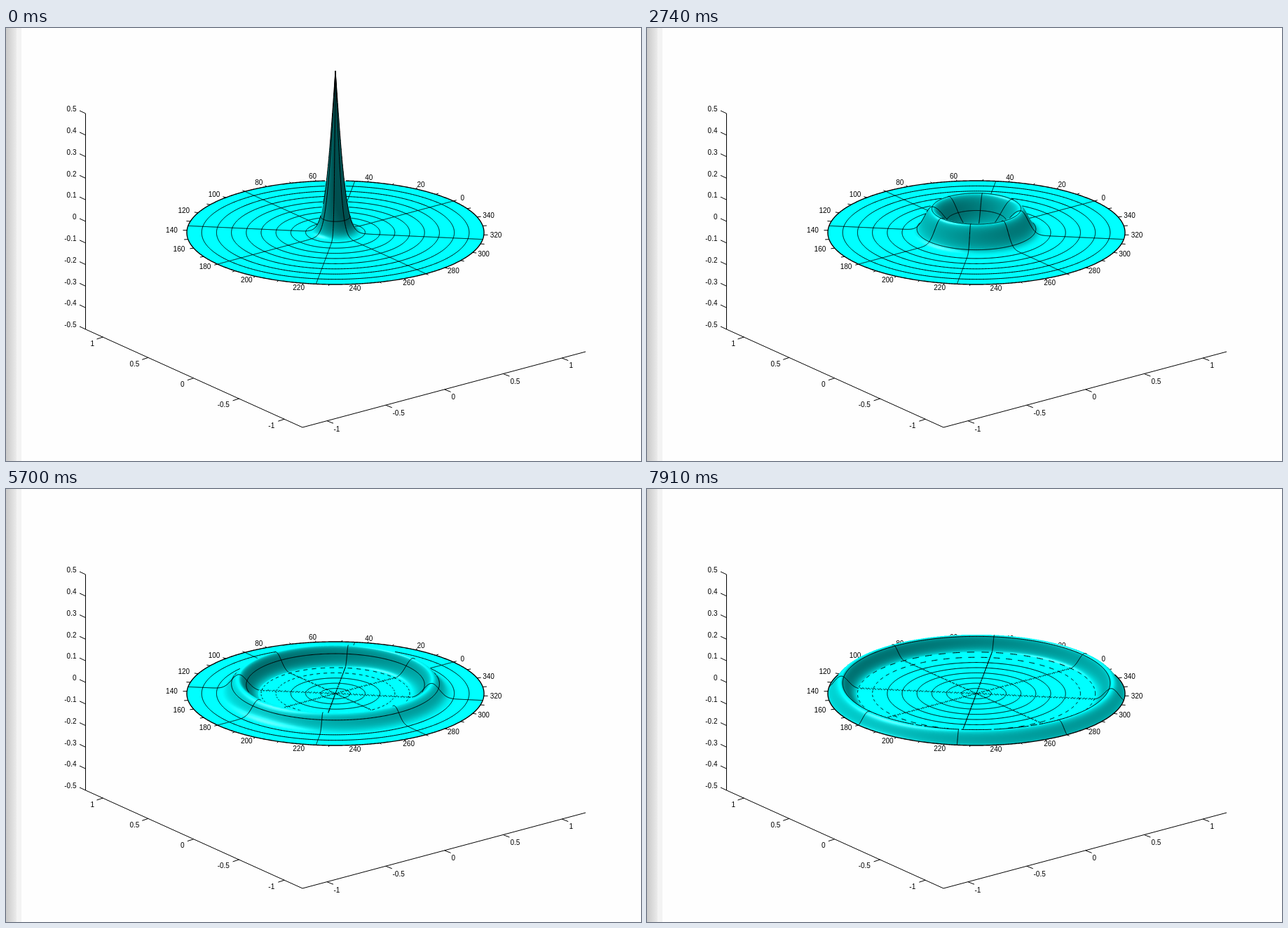
Write an HTML page with a canvas that moves like this. It is 906 px wide and 618 px high and loops after 8000 ms.

```html
<!DOCTYPE html>
<html lang="en">
<head>
<meta charset="utf-8">
<title>Circular wave</title>
<style>
  html, body { margin: 0; width: 100%; height: 100%; overflow: hidden; background: #fefefe; }
  canvas { display: block; width: 100vw; height: 100vh; }
</style>
</head>
<body>
<canvas id="stage" width="906" height="618"></canvas>
<script>
const ctx = document.getElementById('stage').getContext('2d');
const CX = 470, CY = 292, RX = 212, RY = 74, ZS = 308;   // projection
const TURN = 37.5;                                       // screen angle of 0 degrees
const X0 = 256, Y0 = 52, S = 2, COLS = 428 * S, ROWS = 318 * S;
const N = 2000;
const LOOP = 8000, FIRST = 498, STEP = 148.2, LAST = 51;

const surface = document.createElement('canvas');
surface.width = COLS;
surface.height = ROWS;
const sctx = surface.getContext('2d');
const img = sctx.createImageData(COLS, ROWS);
const depth = new Float32Array(COLS * ROWS);
const height = new Float32Array(N + 2);

const unit = v => { const l = Math.hypot(...v); return v.map(c => c / l); };
const LIGHT = unit([-0.2, -0.13, 1]);
const GLINT = unit([-0.35, 0.42, 0.84]);
const AMBIENT = 0.31;
const dot = (a, x, y, z) => a[0] * x + a[1] * y + a[2] * z;
const rad = deg => deg * Math.PI / 180;

// Shape of the wave at one step: a spike that turns into a travelling ring.
function waveAt(k) {
  const R = 0.017 + 0.0177 * k;
  const back = Math.min(0.25, 0.07 + 0.042 / R);
  const amp = 0.0518 * R ** -0.63;
  const e = Math.min(1, k / 6), mix = e * e * (3 - 2 * e);
  return {
    floor: R - back,
    at(r) {
      const x = r - R;
      let ring = 0;
      if (x > 0) ring = Math.exp(-((x / 0.072) ** 2));
      else if (x > -back) ring = 1.06 * Math.exp(-((1.694 * x / back) ** 2)) - 0.06;
      ring *= amp * (1 - r ** 36);
      const spike = 0.75 * Math.exp(-13 * r - 100 * r * r);
      return spike * (1 - mix) + ring * mix;
    }
  };
}

const heightAt = r => height[Math.min(N, Math.round(r * N))];

function paint(p, r, dx, dy, g) {
  const i = Math.max(2, Math.min(N - 2, Math.round(r * N)));
  const fall = (height[i - 2] - height[i + 2]) * N / 4;
  const m = fall * (fall < 0 ? 3.1 : 1.55);              // the inner wall shades deeper
  const q = 1 / Math.sqrt(1 + m * m), s = m * q / (r || 1);
  const nx = s * dx, ny = s * dy;
  const lit = Math.max(0, dot(LIGHT, nx, ny, q) / LIGHT[2]);
  const tone = Math.min(1, AMBIENT + (1 - AMBIENT) * lit);
  const shine = 0.4 * Math.max(0, dot(GLINT, nx, ny, q)) ** 50;
  depth[p] = g;
  img.data[p * 4] = 255 * shine;
  img.data[p * 4 + 1] = img.data[p * 4 + 2] = 255 * (tone + shine);
  img.data[p * 4 + 3] = 255;
}

// Fill each column from the near edge to the far edge, keeping what is in front.
function drawSurface() {
  img.data.fill(0);
  depth.fill(-1);
  for (let c = 0; c < COLS; c++) {
    const dx = (X0 + (c + 0.5) / S - CX) / RX;
    if (Math.abs(dx) >= 1) continue;
    const half = RY * Math.sqrt(1 - dx * dx);
    let top = Math.round((CY + half - Y0) * S);
    for (let g = CY + half; g > CY - half; g -= 0.25) {
      const dy = (g - CY) / RY, r = Math.sqrt(dx * dx + dy * dy);
      const row = Math.max(0, Math.round((g - ZS * heightAt(r) - Y0) * S));
      while (top > row) {
        top--;
        paint(top * COLS + c, r, dx, dy, g);
      }
    }
  }
  sctx.putImageData(img, 0, 0);
  ctx.drawImage(surface, X0, Y0, COLS / S, ROWS / S);
}

function ground(r, deg) {
  return [CX + RX * r * Math.cos(rad(deg)), CY - RY * r * Math.sin(rad(deg))];
}

function visible(x, y, g) {
  const c = Math.floor((x - X0) * S), r = Math.floor((y - Y0) * S);
  if (c < 0 || r < 0 || c >= COLS || r >= ROWS) return true;
  return g > depth[r * COLS + c] - 1.2;
}

// A curve on the surface; point(i) gives [r, angle, shown, lift].
function curve(count, point) {
  let pen = false;
  ctx.beginPath();
  for (let i = 0; i <= count; i++) {
    const [r, deg, shown, lift] = point(i);
    const [x, g] = ground(r, deg);
    const y = g - ZS * heightAt(r);
    const on = shown && visible(x, y, g);
    if (on) ctx[pen ? 'lineTo' : 'moveTo'](x, y - lift);
    pen = on;
  }
  ctx.stroke();
}

function drawGrid(wave) {
  const inWake = r => r < wave.floor;
  for (let n = 1; n <= 10; n++) {
    const r = n / 10, ragged = inWake(r) && r > wave.floor - 0.12;
    ctx.lineWidth = n === 10 ? 1.4 : 1;
    curve(720, i => [r, i / 2, !ragged || i % 14 < 8, 0]);
  }
  ctx.lineWidth = 1;
  for (let n = 0; n < 8; n++) {
    curve(400, i => {
      const r = i / 400, wake = inWake(r);
      return [r, TURN + 45 * n, !wake || i % 16 < 14, wake ? 0.7 * Math.sin(i * 0.8) : 0];
    });
  }
}

function line(x1, y1, x2, y2) {
  ctx.beginPath();
  ctx.moveTo(x1, y1);
  ctx.lineTo(x2, y2);
  ctx.stroke();
}

function label(text, x, y, align) {
  ctx.textAlign = align;
  ctx.fillText(text, x, y);
}

function drawAxes() {
  line(113.5, 122, 113.5, 430);
  line(113.5, 430, 423, 570);
  line(423, 570, 827, 462);
  for (let i = 0; i <= 10; i++) {
    const y = 122 + 30.8 * i;
    line(113.5, y, 105, y - 4);
    label(String((5 - i) / 10), 100.5, y - 5.5, 'right');
  }
  for (let i = 0; i < 5; i++) {
    const x = 138.5 + 64.7 * i, y = 441 + 29.3 * i;
    line(x, y, x - 9, y + 3);
    label(String(1 - i / 2), 126 + 64.3 * i, 451 + 29.2 * i, 'right');
    const u = 458 + 83.8 * i, v = 560.7 - 22.4 * i;
    line(u, v, u + 9, v + 3.5);
    label(String(i / 2 - 1), 467.5 + 84 * i, 573 - 22.7 * i, 'left');
  }
}

function drawDial() {
  for (let a = 0; a < 360; a += 10) {
    line(...ground(1, a + TURN), ...ground(1.027, a + TURN));
    if (a % 20) continue;
    const t = rad(a + TURN);
    label(String(a), 467.7 + 231.5 * Math.cos(t), 292.5 - 80.5 * Math.sin(t), 'center');
  }
}

function drawMargin() {
  const shade = ctx.createLinearGradient(0, 0, 15, 0);
  shade.addColorStop(0, '#c9c9c9');
  shade.addColorStop(1, '#ebebeb');
  ctx.fillStyle = shade;
  ctx.fillRect(0, 0, 15, 618);
  ctx.fillStyle = '#f3f3f3';
  ctx.fillRect(15, 0, 7, 618);
}

function draw(k) {
  const wave = waveAt(k);
  for (let i = 0; i <= N + 1; i++) height[i] = Math.max(0, wave.at(Math.min(1, i / N)));
  ctx.fillStyle = '#fefefe';
  ctx.fillRect(0, 0, 906, 618);
  drawMargin();
  ctx.fillStyle = ctx.strokeStyle = '#000';
  ctx.lineWidth = 1;
  ctx.font = '10px "Liberation Sans", Arial, sans-serif';
  ctx.textBaseline = 'middle';
  drawAxes();
  drawDial();
  drawSurface();
  drawGrid(wave);
}

let shown = -1;
function tick() {
  const t = performance.now() % LOOP;
  const k = Math.max(0, Math.min(LAST, Math.floor((t - FIRST) / STEP) + 1));
  if (k !== shown) draw(shown = k);
  requestAnimationFrame(tick);
}
tick();
</script>
</body>
</html>
```
